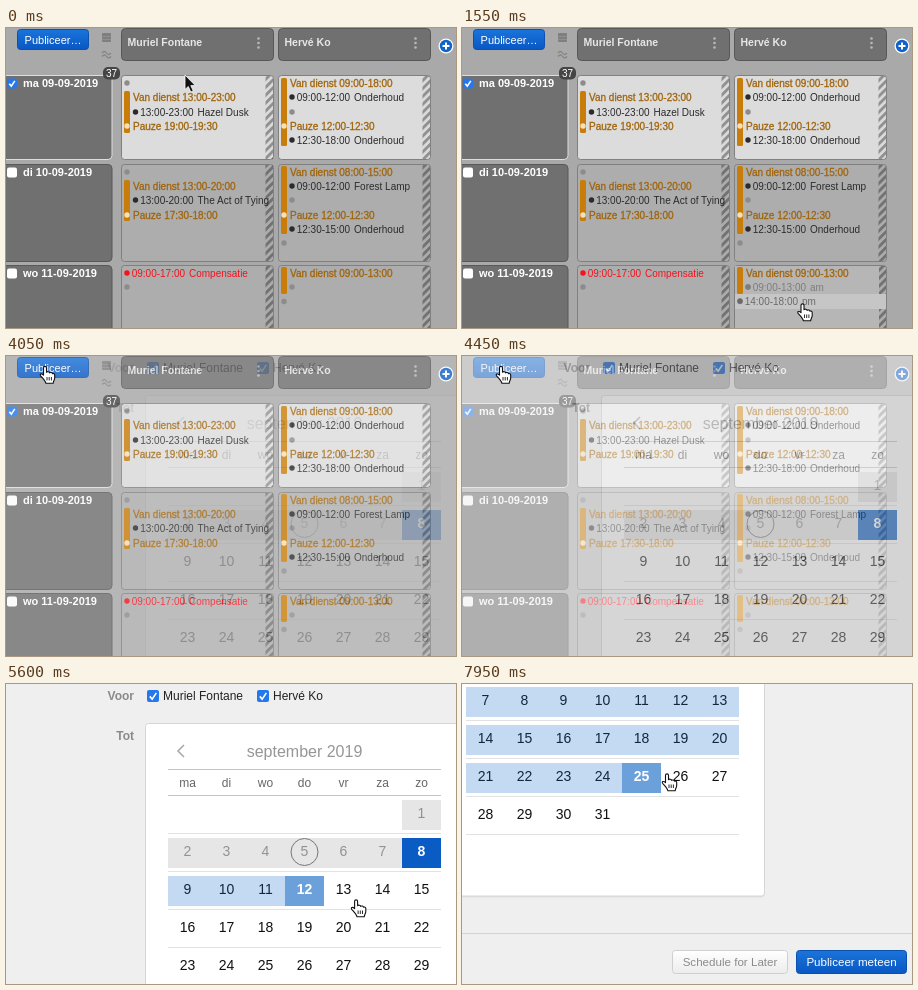
Write an HTML page that moves like this. It is 450 px wide and 300 px high and loops after 8000 ms.

```html
<!DOCTYPE html>
<html lang="nl">
<head>
<meta charset="utf-8">
<title>Rooster publiceren</title>
<style>
html, body { margin: 0; width: 100%; height: 100%; overflow: hidden; background: #efefef; }
svg { display: block; width: 450px; height: 300px; font: 10px "Liberation Sans", Arial, sans-serif; }
text { white-space: pre; }
</style>
</head>
<body>
<svg id="stage" viewBox="0 0 450 300">
  <defs>
    <pattern id="hatch" width="5.6" height="5.6" patternUnits="userSpaceOnUse" patternTransform="rotate(45)">
      <rect width="2.9" height="5.6" fill="#000" opacity=".34"/>
    </pattern>
    <linearGradient id="blue" x2="0" y2="1"><stop stop-color="#1a74dc"/><stop offset="1" stop-color="#0957c3"/></linearGradient>
    <linearGradient id="pale" x2="0" y2="1"><stop stop-color="#fff"/><stop offset="1" stop-color="#ececec"/></linearGradient>
    <path id="arrow" d="M0 0V14.5L3.3 11.5 5.8 17 8.3 16 5.8 10.6H10.3Z" fill="#111" stroke="#fff" stroke-width=".8"/>
    <g id="hand" stroke="#111" stroke-width="1.1" stroke-linejoin="round">
      <path fill="#fff" d="M-1.5 1.3C-1.5-.6 1.5-.6 1.5 1.3V5.8C2.2 4.8 4.4 5 4.6 6.4 5.5 5.7 7.2 6 7.4 7.2 8.5 6.7 9.7 7.3 9.7 8.6V11.5C9.7 13.5 8.3 14.5 8.2 16.8H.9C.5 14.5-2 12.2-4.4 9.3-5.6 7.4-3.4 6.6-1.5 8.7Z"/>
      <path fill="none" d="M2 10.5V14M4.2 10.5V14M6.4 10.5V14" stroke-width=".9"/>
    </g>
  </defs>
  <g id="roster"></g>
  <g id="dialog"><rect width="450" height="300" fill="#efefef"/><g id="page"></g></g>
</svg>
<script>
const $ = id => document.getElementById(id);
const PEOPLE = ["Muriel Fontane", "Hervé Ko"];
const ORANGE = "#c87d0a", BROWN = "#a0640a", DARK = "#0a5bc4";

function add(parent, tag, attrs, content) {
  const el = document.createElementNS("http://www.w3.org/2000/svg", tag);
  for (const k in attrs) el.setAttribute(k, attrs[k]);
  if (content !== undefined) el.textContent = content;
  return parent.appendChild(el);
}
const rect = (p, x, y, width, height, fill, more) => add(p, "rect", { x, y, width, height, fill, ...more });
const text = (p, x, y, s, fill, more) => add(p, "text", { x, y, fill, ...more }, s);
const dot = (p, cx, cy, fill, r = 2.7) => add(p, "circle", { cx, cy, r, fill });
const line = (p, d, stroke, more) => add(p, "path", { d, stroke, fill: "none", ...more });
const bold = size => ({ "font-weight": "bold", "font-size": size });

function checkbox(p, x, y, size, on) {
  rect(p, x, y, size, size, on ? "#2478ec" : "#fff", { rx: 2 });
  if (on) line(p, `M${x + size * .23} ${y + size * .53}l${size * .2} ${size * .23} ${size * .35} ${-size * .52}`, "#fff", { "stroke-width": 1.6 });
}

// Roster
const A = $("roster");
rect(A, 0, 0, 450, 300, "#a9a9a9");
const button = rect(A, 11.5, 1.5, 71, 20, "url(#blue)", { rx: 3, stroke: "#0c51b0" });
text(A, 47, 15.5, "Publiceer…", "#fff", { "font-size": 11, "text-anchor": "middle" });
rect(A, 96, 5, 9, 9, "#7f7f7f", { rx: 1 });
line(A, "M96 8.500h9M96 11.500h9", "#979797", { "stroke-width": .7 });
line(A, "M96 25q2.500-3 4.500 0t4.500 0M96 28.500q2.500-3 4.500 0t4.500 0", "#858585", { "stroke-width": 1.3 });
dot(A, 440, 18, "#fff", 7.5);
dot(A, 440, 18, "#1263c8", 6.2);
line(A, "M436.500 18h7M440 14.500v7", "#fff", { "stroke-width": 2 });

[115.5, 272.5].forEach((x, i) => {
  rect(A, x, .5, 152, 32, "#707070", { rx: 4, stroke: "#575757" });
  text(A, x + 6, 18, PEOPLE[i], "#e6e6e6", bold(10.5));
  for (const y of [10.5, 15, 19.5]) dot(A, x + 137, y, "#b8b8b8", 1.3);
});

[["ma 09-09-2019", 47.5, 84], ["di 10-09-2019", 136.5, 97], ["wo 11-09-2019", 237.5, 97]].forEach(([day, y, h], i) => {
  rect(A, -6, y, 112, h, "#707070", { rx: 4, stroke: i ? "#595959" : "#dedede" });
  checkbox(A, 1, y + 3, 10, !i);
  text(A, 17, y + 11.5, day, "#fff", bold(11));
  for (const x of [115.5, 272.5]) {
    rect(A, x, y, 152, h, i ? "#adadad" : "#dcdcdc", { rx: 3, stroke: "#808080" });
    rect(A, x + 144, y + .5, 7.5, h - 1, "url(#hatch)");
  }
});
rect(A, 97, 39, 17, 12.5, "#454545", { rx: 5 });
text(A, 105.5, 48.5, "37", "#fff", { "text-anchor": "middle" });

const heavy = { stroke: BROWN, "stroke-width": .3 };
const bar = (x, y, h) => rect(A, x - 3, y, 6, h, ORANGE, { rx: 1.5 });
const duty = (x, y, s) => text(A, x, y + 3.5, "Van dienst " + s, BROWN, heavy);
function pause(x, y, s) {
  dot(A, x, y, "#f7dfb6");
  text(A, x + 6, y + 3.5, "Pauze " + s, BROWN, heavy);
}
function item(x, y, time, name, color = "#2b2b2b", p = A) {
  dot(p, x, y, color);
  text(p, x + 4.7, y + 3.5, time, color);
  text(p, x + 62, y + 3.5, name, color);
}
const idle = (x, y) => dot(A, x, y, "#8c8c8c");

idle(121, 55);
bar(121, 63, 42); duty(127, 69, "13:00-23:00");
item(129.5, 84, "13:00-23:00", "Hazel Dusk");
pause(121, 98, "19:00-19:30");
idle(121, 144);
bar(121, 152, 41); duty(127, 158, "13:00-20:00");
item(129.5, 172, "13:00-20:00", "The Act of Tying");
pause(121, 187, "17:30-18:00");
item(121, 245, "09:00-17:00", "Compensatie", "#f5121c");
idle(121, 259);

bar(278, 50, 68); duty(284, 55, "09:00-18:00");
item(286, 69, "09:00-12:00", "Onderhoud");
idle(286, 84);
pause(278, 98, "12:00-12:30");
item(286, 112, "12:30-18:00", "Onderhoud");
bar(278, 138, 68); duty(284, 144, "08:00-15:00");
item(286, 158, "09:00-12:00", "Forest Lamp");
idle(286, 172);
pause(278, 187, "12:00-12:30");
item(286, 201, "12:30-15:00", "Onderhoud");
idle(278, 215);
const hover = add(A, "g", {});
rect(hover, 273, 238, 144, 62, "#b6b6b6");
rect(hover, 273, 266, 151, 15, "#c6c6c6");
bar(278, 239, 27); duty(284, 245, "09:00-13:00");
idle(286, 259);
idle(278, 273.5);
const shifts = add(A, "g", {});
item(286, 259, "09:00-13:00", "am", "#7d7d7d", shifts);
item(278, 273, "14:00-18:00", "pm", "#6a6a6a", shifts);

// Publish dialog
const B = $("page"), days = [];
text(B, 128, 16, "Voor", "#8a8a8a", { ...bold(12), "text-anchor": "end" });
text(B, 128, 56, "Tot", "#8a8a8a", { ...bold(12), "text-anchor": "end" });
[141, 251].forEach((x, i) => {
  checkbox(B, x, 6, 12, true);
  text(B, x + 16, 16, PEOPLE[i], "#222", { "font-size": 12 });
});
rect(B, 139, 40.5, 641, 324, "#000", { rx: 4, opacity: .06 });
rect(B, 139.5, 39.5, 640, 323.5, "#fff", { rx: 3, stroke: "#d6d6d6" });

function month(x, title, offset, count, first) {
  const mid = { "text-anchor": "middle" };
  text(B, x + 136.5, 73, title, "#969696", { "font-size": 16, ...mid });
  line(B, `M${x} 85.500h273M${x} 111.500h273`, "#c4c4c4");
  "ma di wo do vr za zo".split(" ").forEach((d, i) =>
    text(B, x + 19.5 + 39 * i, 103, d, "#666", { "font-size": 12, ...mid }));
  const rows = Math.ceil((offset + count) / 7);
  for (let r = 0; r < rows; r++) line(B, `M${x} ${149.5 + 38 * r}h273`, "#e2e2e2");
  for (let d = 1; d <= count; d++) {
    const i = offset + d - 1, cx = x + 39 * (i % 7), y = 115.5 + 38 * Math.floor(i / 7);
    days[first + d] = {
      box: rect(B, cx, y, 39, 30, "none", { "shape-rendering": "crispEdges" }),
      label: text(B, cx + 19.5, y + 18.5, d, "#111", { "font-size": 14, ...mid })
    };
  }
}
month(162, "september 2019", 6, 30, 0);
month(481, "oktober 2019", 1, 31, 30);
add(B, "circle", { cx: 298.5, cy: 168, r: 13.5, fill: "none", stroke: "#777" });
line(B, "M178 61l-6 6 6 6M738 61l6 6-6 6", "#aaa", { "stroke-width": 1.6 });
line(B, "M0 400.500h960", "#d3d3d3");
rect(B, 687.5, 417.5, 115, 23, "url(#pale)", { rx: 3, stroke: "#cfcfcf" });
text(B, 745, 433, "Schedule for Later", "#8b8b8b", { "font-size": 11.6, "text-anchor": "middle" });
rect(B, 811.5, 417.5, 110, 23, "url(#blue)", { rx: 3, stroke: "#0b4fad" });
text(B, 866.5, 433, "Publiceer meteen", "#fff", { "font-size": 11.6, "text-anchor": "middle" });

// Timing
const ramp = (t, a, b) => Math.min(1, Math.max(0, (t - a) / (b - a)));
const smooth = u => u * u * (3 - 2 * u);
const mix = (a, b, u) => `rgb(${a.map((v, i) => Math.round(v + (b[i] - v) * u))})`;

function along(keys, t, ease) {
  let i = 0;
  while (i < keys.length - 2 && t >= keys[i + 1][0]) i++;
  const [a, x, y] = keys[i], [b, u, v] = keys[i + 1], k = ease(ramp(t, a, b));
  return [x + (u - x) * k, y + (v - y) * k];
}
const pathA = [[0, 179, 47], [800, 338, 278], [850, 338, 278], [900, 340.5, 276], [1550, 340.5, 276], [2300, 39, 10.5]];
const pathB = [[4650, 39, 10.5], [4850, 60, 139], [5600, 350, 216], [6250, 414, 207], [7100, 414, 207],
  [7300, 453, 216], [7500, 460, 150], [7750, 380, 70], [7900, 262, 50], [7950, 205, 90]];
// Last day of the range; October continues from 30.
const rangeEnd = [[5400, 9], [5450, 10], [5500, 11], [5550, 12], [5650, 13], [5800, 14], [5950, 15],
  [7700, 43], [7850, 50], [7900, 53], [7950, 55]];

function pointer(parent) {
  const el = add(parent, "use", {});
  return (x, y, shape) => {
    el.setAttribute("href", "#" + shape);
    el.setAttribute("transform", `translate(${x} ${y})`);
  };
}
const pointA = pointer(A), pointB = pointer($("dialog"));

function paintDays(t) {
  let end = 0;
  for (const [at, day] of rangeEnd) if (t >= at) end = day;
  const chosen = t < 7500 ? ramp(t, 6575, 6700) : 0;
  days.forEach(({ box, label }, n) => {
    const strong = n === 8 || n === end;
    let fill = "none", ink = "#111";
    if (n === 8) fill = t < 6850 ? DARK : t < 6900 ? "#5a7da6" : "#979797";
    else if (n < 8) { fill = "#e6e6e6"; ink = "#929292"; }
    else if (n === end) fill = mix([108, 160, 218], [10, 91, 196], chosen);
    else if (n < end) { fill = "#c3daf2"; ink = "#12273d"; }
    box.setAttribute("fill", fill);
    label.setAttribute("fill", strong ? "#fff" : ink);
    label.setAttribute("font-weight", strong ? "bold" : "normal");
  });
}

function draw(t) {
  const fade = ramp(t, 3800, 5100);
  A.style.display = fade < 1 ? "" : "none";
  $("dialog").style.display = fade > 0 ? "" : "none";
  $("dialog").setAttribute("opacity", fade);
  const shown = ramp(t, 650, 800) * (1 - ramp(t, 1600, 1800));
  for (const el of [hover, shifts]) el.setAttribute("opacity", shown);
  button.setAttribute("fill", t >= 2650 && t < 3650 ? "#0a50b2" : "url(#blue)");
  pointA(...along(pathA, t, smooth), t >= 900 && t < 1650 || t >= 2200 ? "hand" : "arrow");
  pointB(...along(pathB, t, u => u), t < 4700 || t >= 5350 ? "hand" : "arrow");
  const pan = smooth(ramp(t, 7400, 7850));
  B.setAttribute("transform", `translate(${-477 * pan} ${-151 * pan})`);
  paintDays(t);
}

const start = performance.now();
function tick() {
  draw((performance.now() - start) % 8000);
  requestAnimationFrame(tick);
}
tick();
</script>
</body>
</html>
```
